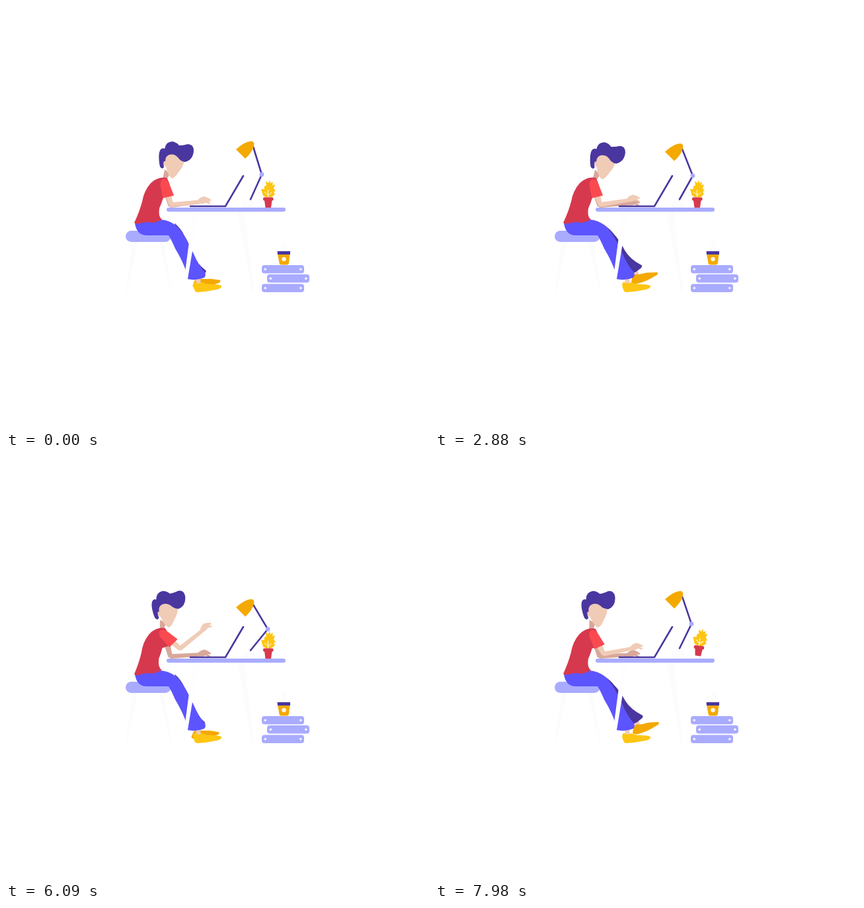
Write an HTML page that moves like this. It is 640 px wide and 640 px high and loops after 8000 ms.

```html
<!DOCTYPE html>
<html lang="en">
<head>
<meta charset="utf-8">
<title>Working at the desk</title>
<style>
  html, body { margin: 0; width: 100%; height: 100%; overflow: hidden; background: #fff; }
  svg { display: block; width: 100vw; height: 100vh; }
  .lavender { fill: #a9abff; }
  .purple { fill: #4a369f; }
  .blue { fill: #5c54ff; }
  .red { fill: #d6394e; }
  .bright { fill: #fa4a50; }
  .orange { fill: #f4a900; }
  .yellow { fill: #fec612; }
  .skin { fill: #f0cbb6; }
  .shade { fill: #d8a89a; }
  .pale { fill: #fcfcfd; }
  .line { fill: none; stroke: #4a369f; stroke-width: 2.6; stroke-linecap: round; }
</style>
</head>
<body>
<svg viewBox="0 0 640 640">
  <defs>
    <path id="forearm" d="M-1,-3.4 L41,-3 Q46,-7 51,-7.5 Q56,-6 61,-1.5 Q61,1 55,-.5 Q60,2 59,4 Q56,4 53,1.5 Q49,3 44,2.4 L1,3.5 Q-4,3 -1,-3.4Z"/>
    <path id="upperArm" d="M8,-5 L34,-3.2 Q38,0 34,3.4 L8,5Z"/>
    <path id="sleeve" d="M22,-8 L21,9 Q10,8 1,7 Q-6,5 -6.5,0 Q-5,-6 2,-6.5Z"/>
    <g id="book">
      <rect class="lavender" width="64" height="12.4" rx="4"/>
      <circle cx="5.3" cy="6.3" r="1.7" fill="#fff"/>
      <circle cx="58.8" cy="6.3" r="1.7" fill="#fff"/>
    </g>
  </defs>

  <!-- stool and far desk leg -->
  <path class="pale" d="M192,356H200L183,432H181Z M231,356H238L251,432H249Z M350,310H361L375,432H372Z"/>
  <rect class="lavender" x="181" y="340" width="68.500" height="17" rx="8.500"/>

  <!-- far leg -->
  <g id="farLeg">
    <path class="skin" d="M301,400 L308,396 L310,405 L302,409Z"/>
    <path class="orange" d="M300,410 Q303,404 308,405 Q316,404 322,402 Q332,401 338,401 Q341,404 334,407 Q322,415 311,418 Q303,421 299,418Z"/>
    <path class="purple" d="M253,330 Q264,336 271,345 Q280,354 288,369 Q296,382 314,391 Q316,394 311,397 Q306,402 300,404 Q288,392 280,374 L262,345Z"/>
  </g>

  <!-- near leg -->
  <path class="skin" d="M287,411 L294,411 L295,421 L288,421Z"/>
  <path class="yellow" d="M284,419 Q286,416 288,419 Q293,421 297,418 Q302,421 311,421 Q321,421 326,423 Q327,427 319,429 Q305,432 290,433 Q286,433 285,429 Q282,423 284,419Z"/>
  <path class="blue" d="M195,329 Q198,347 213,347 H246 Q250,353 256,367 Q268,387 273,403 L274,413 Q288,416 300,411 Q303,408 301,403 Q291,392 284,375 Q272,349 262,337 Q252,325 234,323Z"/>
  <path fill="#fefefe" d="M283,311 H292 L271.600,433 H267Z"/>

  <!-- far arm -->
  <g transform="translate(240 269) rotate(75)"><use href="#upperArm" class="shade"/></g>
  <use id="farForearm" href="#forearm" class="shade"/>

  <g id="head">
    <path class="shade" d="M240,247 L248,254 L243,263 L237,262Z"/>
    <path class="skin" d="M239,233 Q237,240 242,243 Q245,257 251,261 Q256,260 262,250 Q269,242 270,233 Q262,220 249,221 Q243,223 239,233Z"/>
    <path class="purple" d="M232,238 Q230,222 234,217 Q237,214 240,216 Q242,205 252,205 Q258,206 262,211 Q269,211 275,209 Q284,209 284,219 Q283,233 271,236 Q264,235 260,229 Q255,223 247,225 Q241,227 241,235 Q237,233 239,244 Q236,248 233,243Z"/>
  </g>

  <g id="torso">
    <path class="red" d="M240,259.500 Q228,259 219,268 Q209,279 206,296 Q202,311 194,328 Q198,331 206,328 Q214,326 223,328 Q230,326 236,323 Q230,319 232,306 Q236,297 238,290 L251,286 Q247,264 243,260Z"/>
    <g id="arm">
      <use href="#upperArm" class="skin"/>
      <use id="forearmNear" href="#forearm" class="skin"/>
      <use href="#sleeve" class="bright"/>
    </g>
  </g>

  <!-- desk and laptop -->
  <path class="line" d="M279,303 H332 L359,257"/>
  <rect class="lavender" x="243" y="305" width="180" height="6.200" rx="3.100"/>

  <g id="lamp">
    <path class="pale" d="M356,305 Q357,293 367,293 Q377,293 378,305Z"/>
    <path id="lampArm" class="line"/>
    <circle id="lampJoint" class="lavender" r="3.400"/>
    <path id="lampShade" class="orange" d="M348,217 Q361,205 371,204.500 Q376,205 375.300,210 Q374,220 362,231Z"/>
  </g>

  <g id="plant">
    <path class="yellow" d="M396,290 Q388,288 388,284 L386,277 L391,277 Q390,271 394,272 L393,265 L397,268 L399,263 L400,268 L404,266 L403,271 L407,270 L405,276 L408,280 L405,281 L407,285 L402,289Z"/>
    <path d="M396.500,291V278 M396.500,286L391,281 M396.500,287L402,282" fill="none" stroke="#fff"/>
    <rect class="red" x="389" y="289.500" width="15.500" height="5" rx="1.800"/>
    <path class="red" d="M391,294H402.500L401,305H392.500Z"/>
  </g>

  <!-- books and cup -->
  <use href="#book" x="387" y="392"/>
  <use href="#book" x="395" y="406"/>
  <use href="#book" x="387" y="420.500"/>
  <path class="pale" d="M416,366 Q418,359 422,354 Q422,359 427,359 Q423,363 425,367Z"/>
  <path class="orange" d="M411,375H429.500L428,389Q427,391.500 425,391.500H416Q414,391.500 413.500,389Z"/>
  <path class="purple" d="M410.500,371H430V376H411Z"/>
  <circle cx="420.500" cy="383" r="3.300" fill="#fff6e6"/>
</svg>
<script>
const LOOP = 8000;
const SLAMS = [7020, 7890];
const TAU = Math.PI * 2;
const $ = id => document.getElementById(id);
const clamp = v => Math.min(1, Math.max(0, v));
const set = (id, transform) => $(id).setAttribute('transform', transform);

// Linear interpolation through [time, value] points.
function track(points, t) {
  const i = points.findIndex(p => p[0] > t);
  if (i === 0) return points[0][1];
  if (i < 0) return points[points.length - 1][1];
  const [t0, a] = points[i - 1], [t1, b] = points[i];
  return a + (b - a) * (t - t0) / (t1 - t0);
}

const headTilt = [[0, 0], [4140, 5], [4890, 0], [5670, -8], [6090, -10.5], [6500, -14], [6870, -13], [7420, -14], [7980, -9.5]];
const lean = [[4100, 0], [6000, -2], [7000, -2], [7980, -0.5]];
const tapCycles = [[0, .11], [1710, 2.29], [2880, 3.61], [4140, 5.21], [6090, 7.96], [6870, 8.79], [7980, 10.5]];
const shoulder = [[5700, 73], [6090, 44], [6500, -20], [6620, -20], [6870, 18], [7020, 72], [7100, 62], [7420, -20], [7600, -20], [7880, 70], [7980, 63]];
const elbow = [[5700, -7], [6090, -36], [6500, -86], [6620, -86], [6870, -67], [7020, -7], [7100, -11], [7420, -86], [7600, -86], [7880, -7], [7980, -10]];

// Height of the hop that things on the desk make after a slam.
function hop(t) {
  return SLAMS.reduce((sum, slam) => {
    const p = clamp((t - slam) / 300);
    return sum + 16 * p * (1 - p);
  }, 0);
}

function draw(t) {
  set('head', `rotate(${track(headTilt, t)} 232 285)`);
  set('torso', `rotate(${track(lean, t)} 212 330)`);
  set('farLeg', `rotate(${6.5 + 6.5 * Math.cos(TAU * track(tapCycles, t))} 262 338)`);

  const typing = Math.cos(TAU * t / 390);
  const upper = track(shoulder, t);
  const fore = track(elbow, t) + (t < 5700 ? 2 * typing : 0);
  set('arm', `translate(240 268) rotate(${upper})`);
  set('forearmNear', `translate(34 0) rotate(${fore - upper})`);
  set('farForearm', `translate(249.5 301.5) rotate(${-4.5 - 2 * typing})`);

  const lift = hop(t);
  const recoil = clamp((t - SLAMS[0]) / 180);
  const sag = (1 - Math.cos(Math.PI * t / LOOP)) / 2 * (1 - 0.9 * recoil);
  const jointX = 387 + 10.5 * sag, jointY = 255 + 6.3 * sag, drop = 12 * sag;
  $('lampArm').setAttribute('d', `M374,${213 + drop} L${jointX},${jointY} L370,292.500`);
  $('lampJoint').setAttribute('cx', jointX);
  $('lampJoint').setAttribute('cy', jointY);
  set('lampShade', `translate(0 ${drop})`);
  set('lamp', `translate(0 ${-0.9 * lift})`);
  set('plant', `translate(${0.3 * lift} ${-1.2 * lift}) rotate(${2.2 * lift} 397 305)`);
}

const start = performance.now();
function frame() {
  draw((performance.now() - start) % LOOP);
  requestAnimationFrame(frame);
}
frame();
</script>
</body>
</html>
```
